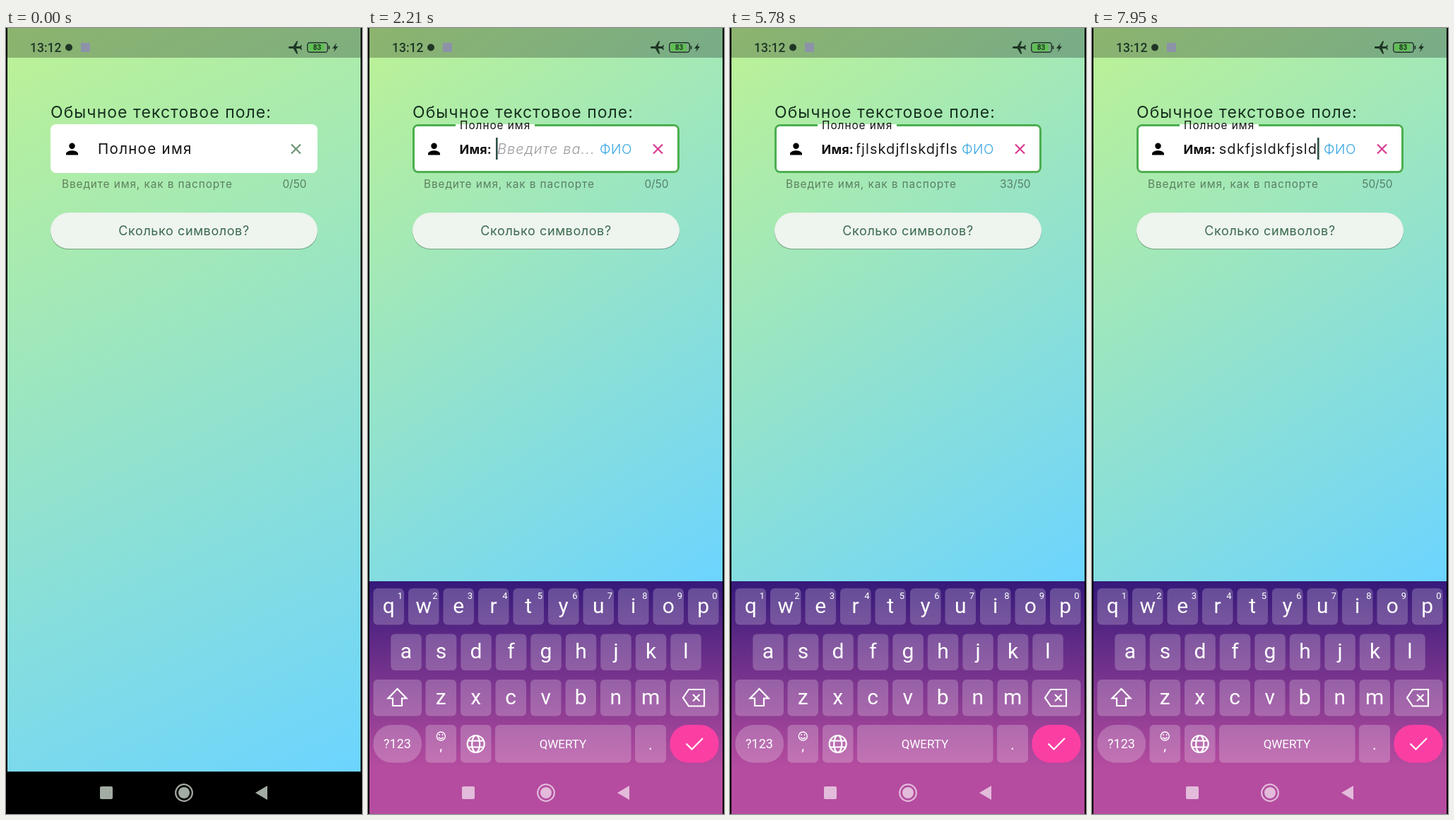
Animation, 504 px wide and 1111 px high, one loop 8000 ms. Source, as an HTML page:

```html
<!DOCTYPE html>
<html lang="ru">
<head>
<meta charset="utf-8">
<title>Текстовое поле</title>
<style>
  html, body { margin: 0; width: 100%; height: 100%; overflow: hidden; background: #000; }
  svg { display: block; width: 504px; height: 1111px; }
  text { font-family: Inter, "Open Sans", sans-serif; white-space: pre; }
  .ui { font-family: Roboto, sans-serif; }
  .title { font-size: 23px; letter-spacing: 1.05px; fill: #16301f; }
  .label { font-size: 20.5px; letter-spacing: 1.3px; fill: #111; }
  .prefix { font-size: 18px; font-weight: 700; letter-spacing: .2px; fill: #111; }
  .hint { font-size: 20px; font-weight: 300; font-style: italic; letter-spacing: 1.05px; fill: #9a9a9f; }
  .suffix { font-size: 19px; font-weight: 300; letter-spacing: .5px; fill: #35a5e2; }
  .typed { font-size: 20px; letter-spacing: 1.05px; fill: #1c1c1c; }
  .helper { font-size: 15.4px; letter-spacing: .9px; fill: #000; fill-opacity: .45; }
  .count { letter-spacing: 0; text-anchor: end; }
  .button { font-size: 18px; letter-spacing: .6px; fill: #3a6a4f; text-anchor: middle; }
  .line { fill: none; stroke-width: 2.2; }
  #keyboard text { fill: #fff; text-anchor: middle; }
  #keyboard .line { stroke: #fff; }
  .key { fill: #fff; fill-opacity: .22; }
  .letter { font-size: 30px; }
  .digit { font-size: 13px; }
</style>
</head>
<body>
<svg viewBox="0 0 504 1111">
  <defs>
    <linearGradient id="sky" gradientUnits="userSpaceOnUse" x1="2" y1="0" x2="502" y2="1051">
      <stop stop-color="#bdf294"/><stop offset="1" stop-color="#6cd4ff"/>
    </linearGradient>
    <linearGradient id="dusk" x2="0" y2="1">
      <stop stop-color="#35197a"/><stop offset=".8" stop-color="#b54c9f"/>
    </linearGradient>
    <clipPath id="view"><rect x="179.5" y="145" width="144.5" height="50"/></clipPath>
  </defs>

  <rect id="page" x="2" width="500" height="1051" fill="url(#sky)"/>
  <rect x="2" width="500" height="42" fill-opacity=".26"/>

  <g fill="#1f3626">
    <text class="ui" x="34" y="34" font-size="17.5" font-weight="500">13:12</text>
    <circle cx="89" cy="27.5" r="5"/>
    <rect x="106" y="21" width="13" height="13" fill="#8c93a8"/>
    <path transform="translate(409.5 27.5) rotate(-90) scale(.95) translate(-11.5 -12)" d="M21 16v-2l-8-5V3.5c0-.83-.67-1.5-1.5-1.5S10 2.67 10 3.5V9l-8 5v2l8-2.5V19l-2 1.5V22l3.5-1 3.5 1v-1.5L13 19v-5.5l8 2.5z"/>
    <rect x="428.5" y="22.5" width="22" height="10" rx="1.5" fill="#5fc052"/>
    <rect x="426.7" y="20.7" width="28.6" height="13.6" rx="3.5" fill="none" stroke="#1f3626" stroke-width="1.4"/>
    <rect x="456.5" y="25" width="1.8" height="5" rx=".8"/>
    <text class="ui" x="440.5" y="31" font-size="10" font-weight="700" text-anchor="middle">83</text>
    <path d="M468 21l-6 8h3.5l-1.500 5 6-8h-3.500z"/>
  </g>

  <text class="title" x="63" y="127">Обычное текстовое поле:</text>
  <rect x="63" y="136" width="378" height="69" rx="8" fill="#fff"/>
  <path id="border" class="line" stroke="#4caf50" style="stroke-width:3" d="M236 137.5H433.5a6 6 0 0 1 6 6V197.5a6 6 0 0 1 -6 6H70.5a6 6 0 0 1 -6 -6V143.5a6 6 0 0 1 6 -6H124"/>
  <path transform="translate(80.8 158.3) scale(1.06)" d="M12 12c2.21 0 4-1.79 4-4s-1.79-4-4-4-4 1.79-4 4 1.79 4 4 4zm0 2c-2.67 0-8 1.34-8 4v2h16v-2c0-2.66-5.33-4-8-4z"/>
  <path id="clear" class="line" d="M404 164.500l13 13m0 -13l-13 13"/>
  <text id="label" class="label">Полное имя</text>
  <g id="focused">
    <text class="prefix" x="129.5" y="178">Имя:</text>
    <text id="hint" class="hint" x="183" y="178">Введите ва...</text>
    <text class="suffix" x="328" y="178">ФИО</text>
    <g clip-path="url(#view)">
      <text id="typed" class="typed" y="178"></text>
      <rect id="caret" y="155" width="2.6" height="31" fill="#2c5048"/>
    </g>
  </g>
  <text class="helper" x="79" y="226">Введите имя, как в паспорте</text>
  <text id="count" class="helper count" x="425.5" y="226"></text>

  <rect x="63" y="263" width="378" height="50" rx="25" fill-opacity=".3"/>
  <rect x="63" y="261" width="378" height="51" rx="25.5" fill="#eef4ee"/>
  <text class="button" x="252" y="293">Сколько символов?</text>

  <g id="keyboard"><rect x="2" y="782" width="500" height="329" fill="url(#dusk)"/></g>

  <g id="nav" fill="#a3aca3" stroke="#a3aca3">
    <rect x="133" y="1072" width="18" height="18" rx="2" stroke="none"/>
    <circle cx="252" cy="1081" r="8" stroke="none"/>
    <circle cx="252" cy="1081" r="11.8" class="line"/>
    <path d="M353 1081l17 -10v20z" stroke="none"/>
  </g>
</svg>
<script>
const $ = id => document.getElementById(id);
const clamp = v => Math.min(1, Math.max(0, v));
const easeOut = p => 1 - (1 - clamp(p)) ** 3;
const LOOP = 8000, FOCUS = 1250, TYPE = 4450, LAG = 130;
const message = 'dlkfjlskdjflskfjlskdjflskdjflskdjfjlsdkfjsldkfjsld';
const pace = [[4380, 0], [4730, 6], [5780, 33], [6970, 50]];
const blinks = [1740, 2210, 2740, 3200, 3730, 4190, 7460, 7950];

function buildKeyboard() {
  const pitch = 49.5;
  const key = (x, y, w = 43.5, h = 51.5, r = 6, extra = '') =>
    `<rect class="key" x="${x}" y="${y}" width="${w}" height="${h}" rx="${r}" ${extra}/>`;
  const label = (s, x, y, size) => `<text class="ui" x="${x}" y="${y}" font-size="${size}">${s}</text>`;
  const line = d => `<path class="line" d="${d}"/>`;
  let out = '';
  [['qwertyuiop', 7.5, 792], ['asdfghjkl', 32.3, 856.5], ['zxcvbnm', 81.5, 921]].forEach(([row, x0, y], r) =>
    [...row].forEach((ch, i) => {
      const x = x0 + i * pitch;
      out += key(x, y) + `<text class="ui letter" x="${x + 21.7}" y="${y + 34.5}">${ch}</text>`;
      if (!r) out += `<text class="ui digit" x="${x + 38}" y="${y + 15}">${(i + 1) % 10}</text>`;
    }));
  out += key(7.5, 921, 68.5) + key(427.5, 921, 69);
  out += key(7.5, 985, 68.5, 53.5, 26) + key(81.5, 985, 43.5, 53.5) + key(131, 985, 43.5, 53.5);
  out += key(180, 985, 192.5, 53.5) + key(378, 985, 44, 53.5);
  out += key(427.5, 985, 69, 53.5, 26, 'style="fill:#fa3fa3;fill-opacity:1"');
  out += label('?123', 41.5, 1018, 18) + label('QWERTY', 276, 1018, 17);
  out += label(',', 103.3, 1021, 20) + label('.', 400, 1020, 22);
  out += line('M41.5 934L54.5 947.5H48V958H35V947.5H28.5Z');
  out += line('M454 935H476V958.5H454L446 946.7ZM460 942l9.5 9.5m0 -9.5l-9.5 9.5');
  out += line('M450.5 1011.5l8 8 15.500 -15.500');
  out += '<g class="line" stroke="#fff"><circle cx="152.7" cy="1012" r="12"/><ellipse cx="152.7" cy="1012" rx="5.5" ry="12"/>' +
    '<path d="M142 1007.5h21.5m0 9h-21.5"/></g>';
  out += '<g fill="none" stroke="#fff" stroke-width="1.4"><circle cx="103.3" cy="1001" r="6"/>' +
    '<path d="M100 1002.5q3.3 4 6.6 0M101 998v2m4.6 -2v2"/></g>';
  $('keyboard').innerHTML += out;
}

function typedCount(t) {
  let n = 0;
  for (let i = 1; i < pace.length; i++) {
    const [t0, n0] = pace[i - 1], [t1, n1] = pace[i];
    n += (n1 - n0) * clamp((t - t0) / (t1 - t0));
  }
  return n;
}

function measure() {
  const el = $('typed');
  el.textContent = message;
  return [0, ...[...message].map((_, i) => el.getSubStringLength(0, i + 1))];
}

function widthAt(n) {
  const i = Math.floor(n);
  return widths[i] + (n - i) * ((widths[i + 1] ?? widths[i]) - widths[i]);
}

function draw(time) {
  // Motion advances in 70 ms steps, as in a screen capture.
  const start = time < TYPE ? FOCUS : TYPE;
  const t = time < FOCUS ? 0 : start + 70 * Math.floor((time - start) / 70);

  const focus = t ? easeOut((t - FOCUS + 35) / 220) : 0;
  $('label').setAttribute('transform', `translate(130 ${178 - 35 * focus}) scale(${1 - .25 * focus})`);
  $('border').style.opacity = $('focused').style.opacity = focus;

  const rise = easeOut((t - 1560) / 320);
  const top = 1111 - 328.5 * rise;
  const bottom = Math.min(1051, top);
  $('keyboard').setAttribute('transform', `translate(0 ${Math.floor(top) - 782})`);
  $('page').setAttribute('height', bottom);
  $('sky').setAttribute('y2', bottom);
  const navColor = rise > .2 ? '#e3bbdb' : '#a3aca3';
  $('nav').setAttribute('fill', navColor);
  $('nav').setAttribute('stroke', navColor);
  $('clear').setAttribute('stroke', rise > 0 ? '#d83c95' : '#6f9576');

  const n = time < TYPE ? 0 : Math.floor(typedCount(t) + 1e-6);
  const scroll = time < TYPE ? 0 : Math.max(0, widthAt(typedCount(t - LAG)) + 4 - 142);
  const x = 181 - scroll;
  $('typed').textContent = message.slice(0, n);
  $('typed').setAttribute('x', x);
  $('caret').setAttribute('x', x + widths[n]);
  $('caret').style.opacity = blinks.filter(b => time >= b).length % 2 ? 0 : 1;
  $('hint').style.opacity = n ? 0 : 1;
  $('count').textContent = n + '/50';
}

buildKeyboard();
const widths = measure();
const origin = performance.now();
function tick() {
  draw((performance.now() - origin) % LOOP);
  requestAnimationFrame(tick);
}
tick();
</script>
</body>
</html>
```
